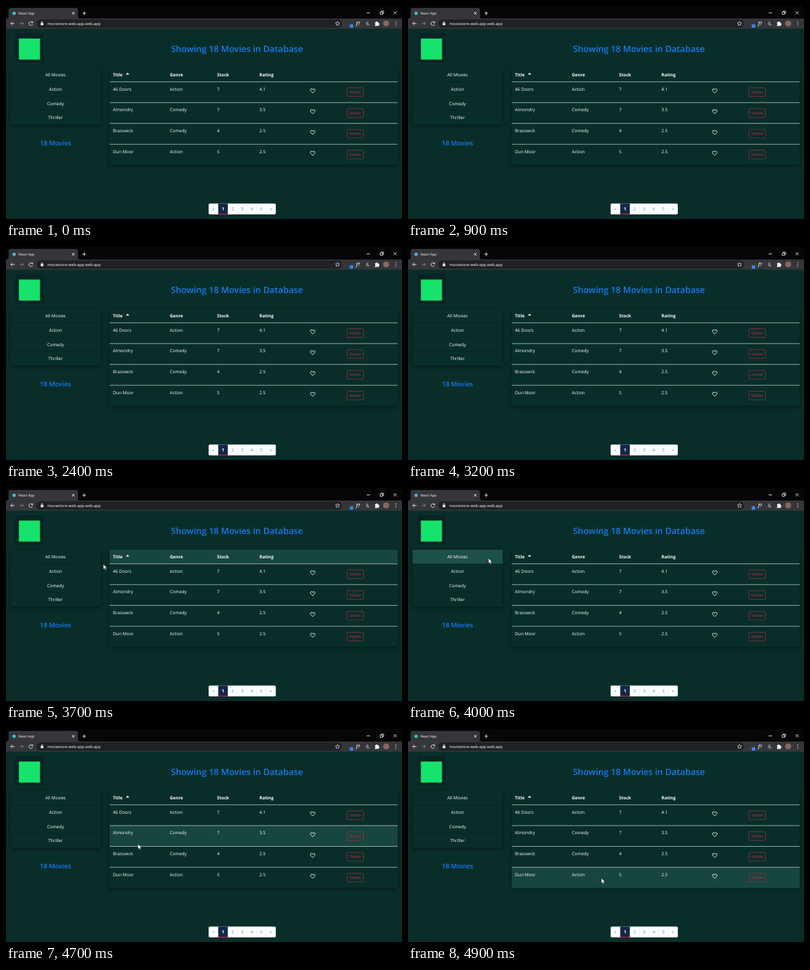
These frames come from a looping animation (600 px wide and 324 px high, 5000 ms). An HTML page:

```html
<!DOCTYPE html>
<html lang="en">
<head>
<meta charset="utf-8">
<title>React App</title>
<style>
  html, body { margin: 0; width: 100%; height: 100%; overflow: hidden; background: #092e2a; }
  svg { display: block; }
  text { font: 6.65px "Open Sans", "Noto Sans", sans-serif; fill: #fff; text-rendering: geometricPrecision; }
  .mid { text-anchor: middle; }
  .head text { font-weight: 700; }
  .title { font-size: 13.24px; font-weight: 600; fill: #167bf0; }
  .count { font-size: 9.9px; font-weight: 600; fill: #167bf0; }
  .tab { font-size: 5.2px; }
  .url { font-size: 5.83px; }
  .delete { font-size: 5.8px; fill: #c12f40; }
  .link { fill: #2a8cff; }
  .current { font-weight: 700; }
  .card { fill: #092e2a; filter: drop-shadow(0 2px 3px rgba(0, 0, 0, .45)); }
  .icon { fill: none; stroke: #e8eaed; stroke-width: .9; }

  .hover, .cursor { opacity: 0; animation: 5s step-end -5ms infinite; }
  .hover { fill: #17453f; }
  .menu { fill: #1d5049; }
  .on-head { animation-name: on-head; }
  .on-menu { animation-name: on-menu; }
  .on-row1 { animation-name: on-row1; }
  .on-row2 { animation-name: on-row2; }
  .on-row3 { animation-name: on-row3; }
  .cursor { animation-name: point; }

  @keyframes on-head { 72% { opacity: 1; } 76% { opacity: 0; } }
  @keyframes on-menu { 76% { opacity: 1; } 90% { opacity: 0; } }
  @keyframes on-row1 { 94% { opacity: 1; } 96% { opacity: 0; } }
  @keyframes on-row2 { 96% { opacity: 1; } 98% { opacity: 0; } }
  @keyframes on-row3 { 98%, 100% { opacity: 1; } }
  @keyframes point {
    0% { opacity: 0; transform: translate(205px, 111px); }
    72% { opacity: 1; transform: translate(205px, 111px); }
    74% { opacity: 1; transform: translate(147.5px, 116px); }
    76% { opacity: 1; transform: translate(129px, 110px); }
    78%, 80% { opacity: 1; transform: translate(122px, 107px); }
    90% { opacity: 1; transform: translate(134px, 122px); }
    92% { opacity: 1; transform: translate(159.7px, 152px); }
    94% { opacity: 1; transform: translate(200px, 175px); }
    96% { opacity: 1; transform: translate(250px, 204px); }
    98%, 100% { opacity: 1; transform: translate(293px, 227px); }
  }
</style>
</head>
<body>
<svg width="600" height="324" viewBox="0 0 600 324">
  <rect width="600" height="324" fill="#092e2a"/>

  <!-- browser window -->
  <rect width="600" height="19" fill="#050606"/>
  <path d="M1 19Q4 19 4 16V6Q4 3 7 3H106Q109 3 109 6V16Q109 19 112 19H600V34.5H0V19Z" fill="#35363a"/>
  <rect x="46" y="20.5" width="463" height="12.5" rx="6.2" fill="#202124"/>
  <circle cx="12.3" cy="11" r="2.6" fill="#45b8d0"/>
  <text class="tab" x="19" y="12.9">React App</text>
  <text class="url" x="62.5" y="28.7">moviestore-web-app.web.app</text>
  <g class="icon">
    <path d="M100 9l4 4m0-4l-4 4M115.7 11h5.6m-2.8-2.8v5.6"/>
    <path d="M546.5 10.5h5M567 9h3.6v3.6h-3.6zM568.5 9v-1.2h3.6v3.6h-1.4M587.3 8l4.6 4.6m0-4.6l-4.6 4.6"/>
    <path d="M13 26.6H7.2m2.6-2.7l-2.7 2.7 2.7 2.7"/>
    <path d="M20.6 26.6h5.8m-2.6-2.7l2.7 2.7-2.7 2.7" stroke="#85878b"/>
    <path d="M40 25.2A2.8 2.8 0 1 0 40.3 27.6M40.4 23.5v2h-2"/>
    <path d="M53.5 26v-1.2a1.1 1.1 0 0 1 2.2 0V26"/>
    <path d="M502.3 23.3l.9 2.2 2.4.2-1.8 1.5.6 2.4-2.1-1.3-2.1 1.3.6-2.4-1.8-1.5 2.4-.2z" stroke-width=".7"/>
  </g>
  <rect x="52.6" y="26" width="4" height="3.3" rx=".4" fill="#e8eaed"/>
  <rect x="520.8" y="27.7" width="5.3" height="5.3" rx=".8" fill="#3585ee"/>
  <text x="530.5" y="29" style="font-style:italic;font-weight:600;font-size:7px">f?</text>
  <path d="M549 23.4a3.2 3.2 0 1 0 2.3 4.9a3.4 3.4 0 0 1-2.3-4.9z" fill="#777a7e"/>
  <path d="M559 24.7h1.6a1.2 1.2 0 1 1 2.4 0h1.7v1.7a1.2 1.2 0 1 1 0 2.4v1.4h-5.7v-1.6a1.1 1.1 0 0 0 0-2.2z" fill="#fff"/>
  <circle cx="576" cy="26.5" r="4.6" fill="#87665f"/>
  <g fill="#e8eaed"><circle cx="590.6" cy="24" r=".7"/><circle cx="590.6" cy="26.6" r=".7"/><circle cx="590.6" cy="29.2" r=".7"/></g>

  <!-- page -->
  <rect x="14" y="41" width="43.5" height="45" fill="#092426"/>
  <rect x="19.5" y="49.5" width="32" height="32" fill="#16e36c"/>
  <text class="title mid" x="350" y="70.2">Showing 18 Movies in Database</text>

  <rect class="card" x="7" y="94" width="136.5" height="86.3"/>
  <rect class="hover menu on-menu" x="7" y="94" width="136.5" height="21.5"/>
  <g id="menu"></g>
  <text class="count mid" x="75" y="212.3">18 Movies</text>

  <rect class="card" x="157" y="94" width="436.5" height="147.5"/>
  <rect class="hover on-head" x="157" y="94" width="436.5" height="21.3"/>
  <g class="head">
    <text x="162" y="106.8">Title</text>
    <path d="M181.6 104.3l2.6-2.7 2.6 2.7z" fill="#fff"/>
    <text x="248.3" y="106.8">Genre</text>
    <text x="319.8" y="106.8">Stock</text>
    <text x="384" y="106.8">Rating</text>
  </g>
  <g id="rows"></g>

  <rect x="307" y="300.5" width="101.8" height="16.5" rx="2" fill="#fff"/>
  <g id="pages"></g>

  <path class="cursor" d="M0 0V7.6L1.8 6 3.1 8.8 4.4 8.2 3.1 5.5H5.4Z" fill="#fff" stroke="#111" stroke-width=".4"/>
</svg>
<script>
  const fill = (id, items, draw) => {
    document.getElementById(id).innerHTML = items.map(draw).join("");
  };

  fill("menu", ["All Movies", "Action", "Comedy", "Thriller"], (name, i) => {
    const y = 94 + i * 21.6;
    const rule = i ? `<path d="M7 ${y}h136.5" stroke="#06221f" stroke-width=".7"/>` : "";
    return `${rule}<text class="mid" x="75" y="${y + 13.4}">${name}</text>`;
  });

  const movies = [
    ["46 Doors", "Action", 7, "4.1"],
    ["Almondry", "Comedy", 7, "3.5"],
    ["Brasswick", "Comedy", 4, "2.5"],
    ["Dun Moor", "Action", 5, "2.5"]
  ];
  const columns = [162, 248.3, 319.8, 384];
  const heart = "M0 3.2C-4.8 -.2 -3.8 -2.9 -1.8 -2.9C-.8 -2.9 -.2 -2.3 0 -1.7C.2 -2.3 .8 -2.9 1.8 -2.9C3.8 -2.9 4.8 -.2 0 3.2Z";

  fill("rows", movies, (movie, i) => {
    const cells = movie.map((value, c) => `<text x="${columns[c]}" y="13.3">${value}</text>`).join("");
    return `<g transform="translate(0 ${115.3 + i * 31.65})">
      <rect class="hover on-row${i}" x="157" width="436.5" height="31.6"/>
      <path d="M157 0h436.5" stroke="#c5cfce" stroke-width=".8"/>
      ${cells}
      <path class="icon" d="${heart}" transform="translate(464.7 13.6)" style="stroke:#fff"/>
      <rect x="516.7" y="9.2" width="24.8" height="13.2" rx="1.2" fill="none" stroke="#b02d3c" stroke-width=".7"/>
      <text class="delete mid" x="529.1" y="17.9">Delete</text>
    </g>`;
  });

  fill("pages", ["«", "1", "2", "3", "4", "5", "»"], (label, i) => {
    const x = 307 + i * 14.54;
    const current = label === "1";
    const back = current
      ? `<rect x="${x}" y="300.5" width="14.54" height="16.5" fill="#14274c"/>
         <rect x="${x}" y="316" width="14.54" height="1.1" fill="#e01b2c"/>`
      : i > 2 ? `<path d="M${x} 300.5v16.5" stroke="#dee2e6" stroke-width=".5"/>` : "";
    return `${back}<text class="mid ${current ? "current" : "link"}" x="${x + 7.27}" y="311.2">${label}</text>`;
  });
</script>
</body>
</html>
```
